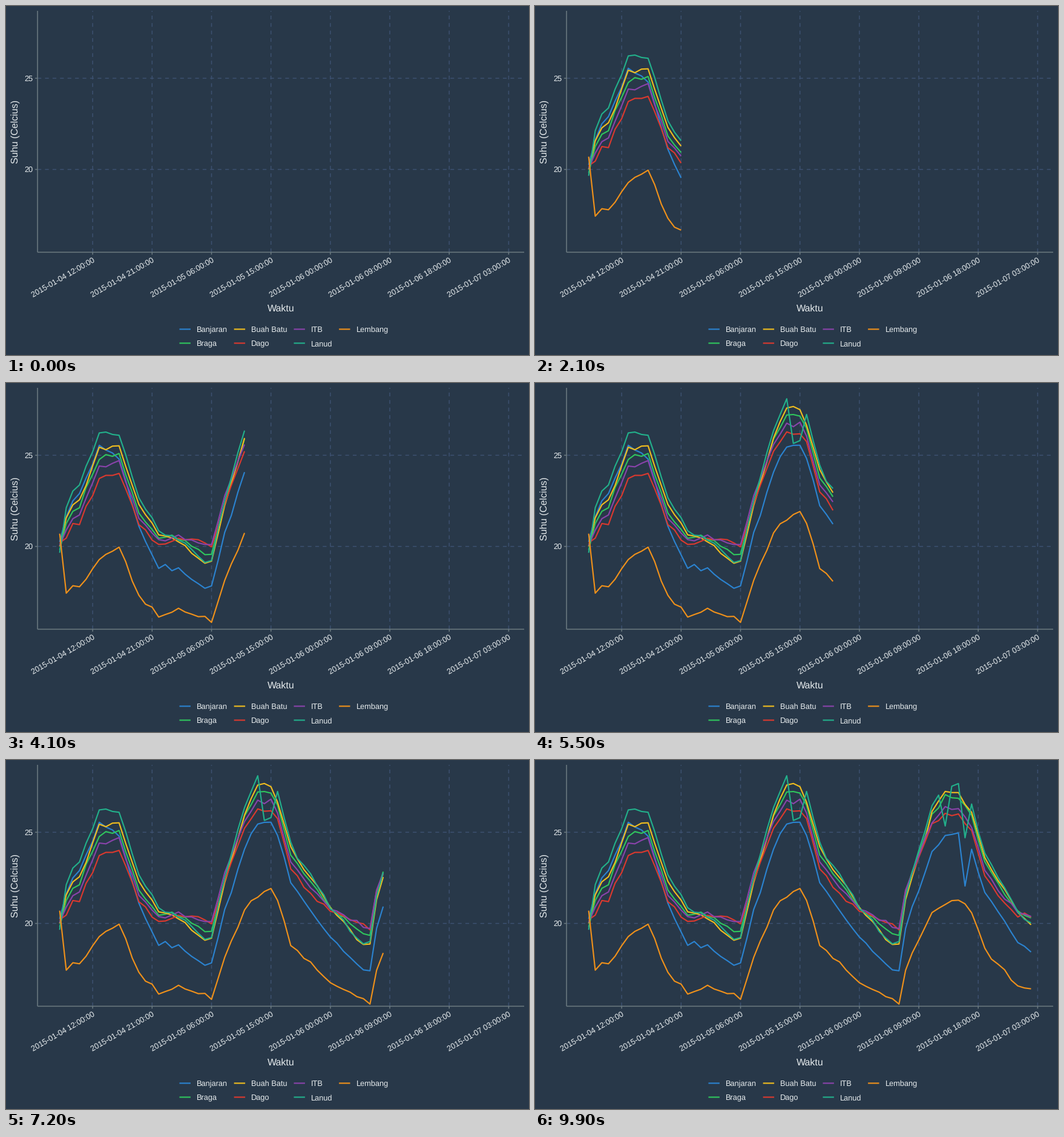
Write a matplotlib script that moves like this. It is 864 by 576 pixels and loops after 10 s.

```python
import numpy as np
import matplotlib
import matplotlib.pyplot as plt
from matplotlib.animation import FuncAnimation

matplotlib.rcParams["font.family"] = "Liberation Sans"
matplotlib.rcParams["text.hinting"] = "none"
matplotlib.rcParams["toolbar"] = "None"

W, H, DPI = 864, 576, 72          # at 72 dpi one point is one pixel
FRAMES, INTERVAL, HOURS = 100, 100, 68

BG, TEXT, AXIS, GRID = "#283849", "#e6ebed", "#6b7a80", "#3c506f"
LEFT, RIGHT, TOP, BOTTOM = 52.1, 856, 8, 406.4
FIRST_X, HOUR_W = 88.64, 10.908
SMALL, LARGE = 12.8, 16

# Shared weather: (hours since 07:00, degrees), one row per day.
WEATHER = [
    (0, 20.05), (2, 21.6), (3, 21.8), (6, 24.35), (9, 24.6), (12, 21.6), (15, 20.25), (18, 20.55),
    (23, 20.05), (25, 22.6), (28, 25.6), (30, 26.75), (32, 26.7), (33, 26.1), (35, 23.4), (37, 22.35), (41, 20.85),
    (47, 19.7), (48, 21.9), (52, 25.6), (54, 26.3), (56, 26.3), (58, 25.3), (60, 22.95), (62, 21.8), (65, 20.6), (67, 20.45),
]

# Difference from the shared weather: at the start, at the three daily peaks,
# in the evening and at dawn; then the hours of passing showers.
CITIES = [
    ("Banjaran", "#2b83d0", 0.2, (1.2, -1.15, -1.45), -1.2, -2.4, [57]),
    ("Braga", "#2fc65d", -0.25, (0.5, 0.45, 0.65), 0.3, -0.5, []),
    ("Buah Batu", "#f0bd1e", -0.05, (1.0, 0.85, 0.95), 0.6, -1.1, []),
    ("Dago", "#dc392e", 0.15, (-0.6, -0.5, -0.35), -0.3, 0, []),
    ("ITB", "#8a43ab", 0, (0, 0, 0), 0, 0, []),
    ("Lanud", "#22b08b", -0.4, (1.9, 1.4, 1.5), 0.75, -1.0, [31, 32, 54, 57]),
    ("Lembang", "#f0911a", 0.65, (-5.0, -5.2, -5.2), -4.1, -4.0, []),
]

fig = plt.figure(figsize=(W / DPI, H / DPI), dpi=DPI, facecolor=BG)
ax = fig.add_axes([0, 0, 1, 1])
ax.set_xlim(0, W)
ax.set_ylim(H, 0)
ax.axis("off")

hours = np.arange(HOURS)
rng = np.random.default_rng(4)


def x_at(hour):
    return FIRST_X + HOUR_W * hour


def y_at(temp):
    return 119.3 + 30.08 * (25 - temp)


def temperatures(start, peaks, evening, dawn, showers):
    # Peak, evening and dawn follow each other every eight hours from hour 6.
    keys = [0, 1, *range(6, 71, 8)]
    offsets = [start, 0.7 * peaks[0]]
    for peak in peaks:
        offsets += [peak, evening, dawn]
    temps = np.interp(hours, *zip(*WEATHER)) + np.interp(hours, keys, offsets)
    temps[1:] += rng.normal(0, 0.07, HOURS - 1)
    temps[showers] -= 2.3
    return temps


def segment(x0, y0, x1, y1, color, width=1.55, **style):
    ax.plot([x0, x1], [y0, y1], color=color, lw=width, snap=False,
            solid_capstyle="butt", dash_capstyle="butt", **style)


def label(x, y, text, size=SMALL, ha="left", angle=0):
    ax.text(x, y, text, size=size, color=TEXT, ha=ha, va="baseline",
            rotation=angle, rotation_mode="anchor")


def draw_axes():
    stamps = ["04 12", "04 21", "05 06", "05 15",
              "06 00", "06 09", "06 18", "07 03"]
    xs = x_at(5 + 9 * np.arange(len(stamps)))

    for temp in (20, 25):
        y = y_at(temp)
        segment(LEFT, y, RIGHT, y, GRID, dashes=(4, 4))
        segment(LEFT - 4, y, LEFT, y, AXIS)
        label(LEFT - 7.2, y + 4.6, str(temp), ha="right")
    for x, stamp in zip(xs, stamps):
        segment(x, BOTTOM, x, TOP, GRID, dashes=(4, 4))
        segment(x, BOTTOM, x, BOTTOM + 4, AXIS)
        label(x + 4.6, BOTTOM + 15.2, f"2015-01-{stamp}:00:00", ha="right", angle=30)

    segment(LEFT, BOTTOM, RIGHT, BOTTOM, AXIS)
    segment(LEFT, TOP, LEFT, BOTTOM, AXIS)
    label((LEFT + RIGHT) / 2, 504, "Waktu", LARGE, "center")
    label(19.6, (TOP + BOTTOM) / 2, "Suhu (Celcius)", LARGE, "center", 90)


def draw_legend():
    columns = [284.2, 374.4, 473.2, 547.8]
    for i, (name, color, *_) in enumerate(CITIES):
        x, y = columns[i // 2], 533.44 + 23.04 * (i % 2)
        segment(x + 2.3, y, x + 20.7, y, color, 2.13)
        label(x + 31, y + 4.9, name)


draw_axes()
draw_legend()

curves = [temperatures(*params) for _, _, *params in CITIES]
lines = [
    ax.plot([], [], color=color, lw=2.13, solid_capstyle="butt",
            solid_joinstyle="round", zorder=3)[0]
    for _, color, *_ in CITIES
]
# Each hour is reached on a whole frame; the tip glides in between.
arrival = np.floor(hours * (FRAMES - 1) / (HOURS - 1) + 0.5)


def update(frame):
    now = np.interp(frame, arrival, hours)
    shown = np.append(hours[hours < now], now) if frame else np.array([])
    for line, temps in zip(lines, curves):
        line.set_data(x_at(shown), y_at(np.interp(shown, hours, temps)))
    return lines


anim = FuncAnimation(fig, update, frames=FRAMES, interval=INTERVAL,
                     repeat=True, repeat_delay=0, blit=False)
plt.show()
```
